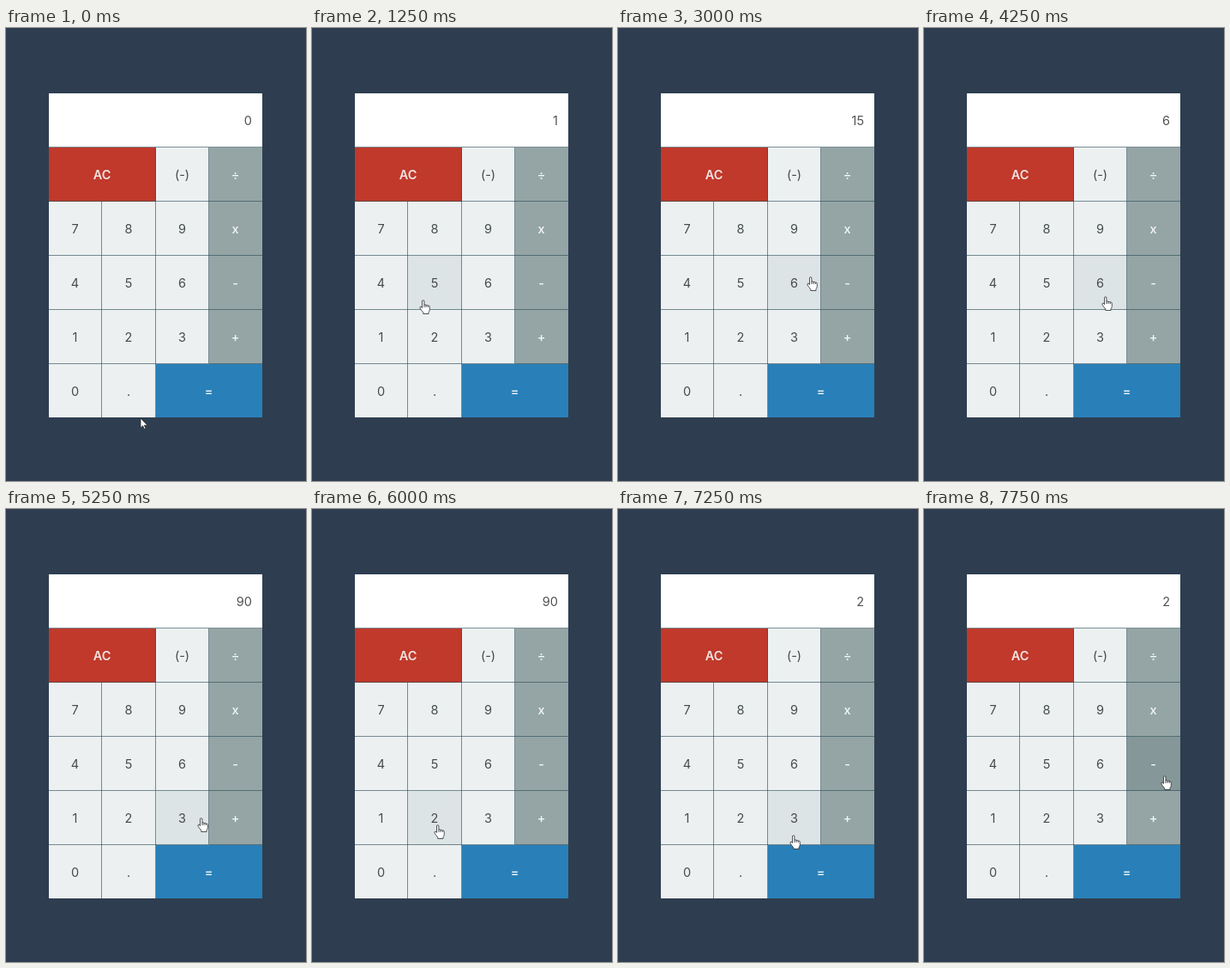
An HTML page that plays this animation: 350x527 px, repeating every 8000 ms.

```html
<!DOCTYPE html>
<html lang="en">
<head>
<meta charset="utf-8">
<title>Calculator</title>
<style>
  html, body { margin: 0; height: 100%; overflow: hidden; background: #2e3e50; }
  svg { display: block; width: 100vw; height: 100vh; }
  text { font: 400 14.5px Rubik, Inter, Roboto, sans-serif; fill: #464b4b; text-anchor: middle; }
  .op text, .eq text { fill: #f4f7f7; font-weight: 500; }
  .ac text { fill: #f3e4e2; font-weight: 600; }
  #display { text-anchor: end; fill: #50534f; }
  .num { fill: #ecf0f1; } .num.hover { fill: #dde4e5; }
  .op { fill: #95a5a5; } .op.hover { fill: #859798; }
  .ac { fill: #c0392b; }
  .eq { fill: #2980b9; }
  #grid { stroke: #2c4c58; stroke-opacity: .62; fill: none; }
  #cursor path { fill: #fff; stroke: #26292c; stroke-width: .8; stroke-linejoin: round; }
</style>
</head>
<body>
<svg viewBox="0 0 350 527">
  <path fill="#fff" d="M50 76H299V139H50Z"/>
  <text id="display" x="287" y="113"></text>
  <g id="keys"></g>
  <path id="grid" d="M50 138.5H299M50 201.5H299M50 264.5H299M50 327.5H299M50 390.5H299
    M111.5 202V453M174.5 139V453M236.5 139V390"/>
  <g id="cursor">
    <path id="arrow" d="M0 0V11.2L2.6 8.8 4.4 12.6 6 11.8 4.3 8.2H8Z"/>
    <g id="hand">
      <path d="M-1.5 8.5V1Q-1.5-.3-.3-.3T.9 1V5Q2.2 4.4 3 5.5Q4.4 4.9 5.2 6Q7.3 5.6 7.3 7.6V10.5
        Q7.2 12.5 6 13.7V15.5H-.2V14Q-2.5 11.5-3.8 9.2Q-4.6 7.4-3.2 7.2T-1.5 8.5Z"/>
      <path d="M.9 5V8M3 5.5V8M5.2 6V8"/>
    </g>
  </g>
</svg>
<script>
const $ = id => document.getElementById(id);
const columns = [50, 112, 175, 237, 299];
const rows = [139, 202, 265, 328, 391, 453];
const layout = [
  ["AC", "AC", "(-)", "÷"],
  ["7", "8", "9", "x"],
  ["4", "5", "6", "-"],
  ["1", "2", "3", "+"],
  ["0", ".", "=", "="]
];
const STEP = 250, LOOP = 8000;

// Pointer position from each step onward: step, x, y
const moves = [
  [0, 157, 454], [1, 98, 374], [2, 84, 362], [5, 130, 317], [6, 142, 300],
  [8, 205, 270], [9, 270, 236], [10, 269, 233], [11, 266, 240], [12, 225, 290],
  [13, 208, 306], [16, 210, 310], [17, 212, 313], [18, 231, 336], [19, 262, 358],
  [21, 228, 360], [22, 192, 375], [23, 152, 383], [24, 147, 368], [26, 146, 363],
  [27, 145, 359], [28, 160, 384], [29, 205, 380], [30, 250, 336], [31, 281, 311]
];
// Display value from each step onward
const values = [[0, "0"], [4, "1"], [7, "15"], [15, "6"], [20, "90"], [25, "2"]];

const kind = label =>
  label === "AC" ? "ac" : label === "=" ? "eq" : "÷x-+".includes(label) ? "op" : "num";

function add(parent, tag, attrs) {
  const node = document.createElementNS("http://www.w3.org/2000/svg", tag);
  for (const name in attrs) node.setAttribute(name, attrs[name]);
  return parent.appendChild(node);
}

const keys = [];
layout.forEach((row, r) => row.forEach((label, c) => {
  if (row[c - 1] === label) return;
  const x = columns[c], y = rows[r];
  const right = columns[c + (row[c + 1] === label ? 2 : 1)], bottom = rows[r + 1];
  const node = add($("keys"), "g", { class: kind(label) });
  add(node, "rect", { x, y, width: right - x, height: bottom - y });
  add(node, "text", { x: (x + right) / 2 - .5, y: y + 37 }).textContent = label;
  keys.push({ node, x, y, right, bottom });
}));

const current = (list, step) => list.filter(item => item[0] <= step).pop();

function draw(now) {
  const step = Math.floor(now % LOOP / STEP);
  const [, x, y] = current(moves, step);
  let over = false;
  for (const key of keys) {
    const hit = x >= key.x && x < key.right && y >= key.y && y < key.bottom;
    key.node.classList.toggle("hover", hit);
    over ||= hit;
  }
  $("display").textContent = current(values, step)[1];
  $("cursor").setAttribute("transform", `translate(${x} ${y})`);
  $("hand").style.display = over ? "" : "none";
  $("arrow").style.display = over ? "none" : "";
}

const start = performance.now();
function tick() {
  draw(performance.now() - start);
  requestAnimationFrame(tick);
}
tick();
</script>
</body>
</html>
```
